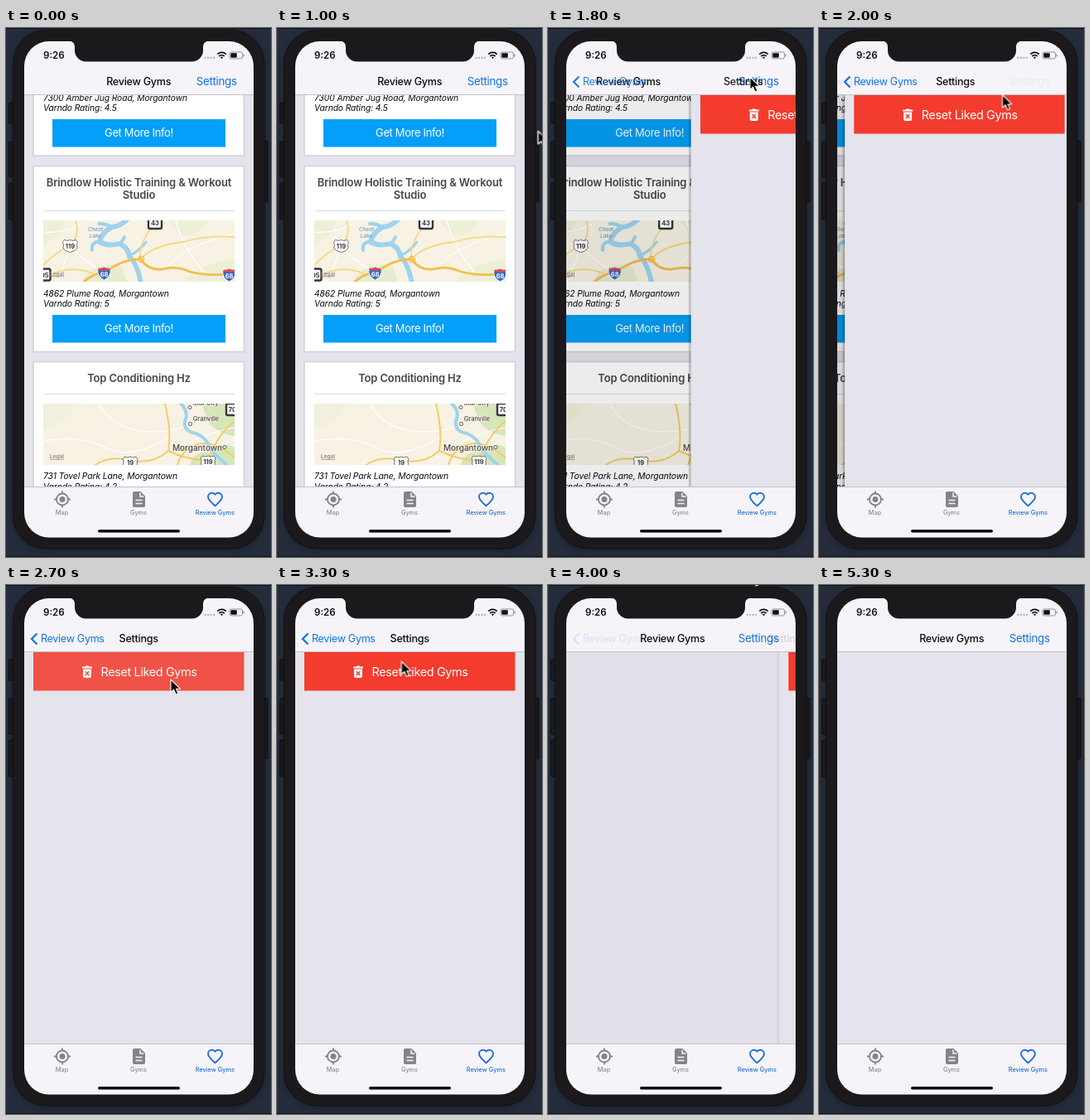
An HTML page for the animation above (5400 ms loop, 320 by 638 pixels).

```html
<!DOCTYPE html>
<html lang="en">
<head>
<meta charset="utf-8">
<title>Review Gyms</title>
<style>
  /* --q: navigation progress, 0 = list, 1 = settings */
  @property --q { syntax: "<number>"; inherits: true; initial-value: 0; }

  html, body { margin: 0; width: 100%; height: 100%; overflow: hidden; background: #252d3c; }
  svg { display: block; width: 320px; height: 638px; animation: navigate 5.4s infinite cubic-bezier(.2833, .99, .31833, .99); }
  text { font-family: Inter, Roboto, sans-serif; }

  .body { filter: drop-shadow(0 2px 4px rgba(0, 0, 0, .3)); }
  .mid { text-anchor: middle; }
  .nav { font-size: 12.56px; letter-spacing: -.3px; }
  .title { font-weight: 500; letter-spacing: -.25px; fill: #0c0c0c; text-anchor: middle; }
  .blue { fill: #1173ea; }
  .heading { font-size: 13px; font-weight: 600; letter-spacing: -.15px; fill: #43484d; text-anchor: middle; }
  .info { font-size: 10.3px; font-style: italic; letter-spacing: -.1px; fill: #0a0a0a; }
  .more { font-size: 12.9px; letter-spacing: -.3px; fill: #fff; text-anchor: middle; }
  .tab { font-size: 7.3px; font-weight: 500; fill: #8c8b90; text-anchor: middle; }
  .card { fill: #fff; stroke: #d3d2dc; stroke-width: 1.6; }
  .rule { stroke: #d9dfe5; }
  .sign { font-size: 7.5px; font-weight: 700; fill: #333; text-anchor: middle; }
  .place { font-weight: 500; fill: #4a4a4a; stroke: #f8f3e6; stroke-width: 1.5; paint-order: stroke; text-anchor: middle; }
  .legal { font-size: 6.5px; font-weight: 600; fill: #8a877f; text-decoration: underline; }
  .line { fill: none; stroke-linecap: round; stroke-linejoin: round; }

  .list { transform: translateX(calc(var(--q) * -83px)); }
  .dim { opacity: calc(var(--q) * .16); }
  .panel { transform: translateX(calc((1 - var(--q)) * 277px)); }
  .edge { opacity: calc(var(--q) * 4); }
  .list-title { transform: translateX(calc(var(--q) * -138.5px)); }
  .panel-title { transform: translateX(calc((1 - var(--q)) * 138.5px)); }
  .on-list { opacity: calc(2 - 2 * var(--q)); }
  .on-panel { opacity: calc(2 * var(--q)); }

  .gyms { animation: clear 5.4s infinite step-end; }
  .reset { animation: press-reset 5.4s infinite ease-in-out; }
  .back { animation: press-back 5.4s infinite ease-in-out; }
  .cursor { animation: point 5.4s infinite ease-in-out; }

  @keyframes navigate {
    0%, 32.074% { --q: 0; }
    41.333%, 70.056% { --q: 1; }
    79.315%, 100% { --q: 0; }
  }
  @keyframes clear { 0% { opacity: 1; } 52%, 100% { opacity: 0; } }
  @keyframes press-reset {
    0%, 49.4% { opacity: 1; }
    51.3% { opacity: .38; }
    55.7%, 100% { opacity: 1; }
  }
  @keyframes press-back {
    0%, 68.1% { opacity: 1; }
    70%, 70.4% { opacity: .25; }
    74.7%, 100% { opacity: 1; }
  }
  @keyframes point {
    0%, 15.74% { transform: translate(332px, 140px); }
    25% { transform: translate(245px, 58px); }
    32.6% { transform: translate(245px, 58px); animation-timing-function: ease-in; }
    37.04% { transform: translate(221.5px, 80.5px); animation-timing-function: ease-out; }
    48.15%, 55.9% { transform: translate(199px, 114px); }
    68.15%, 70.37% { transform: translate(69.5px, 56px); }
    74.07% { transform: translate(245px, -17px); }
    74.8%, 100% { transform: translate(270px, -40px); }
  }
</style>
</head>
<body>
<svg viewBox="0 0 320 638">
  <defs>
    <clipPath id="content"><rect x="22" y="81" width="277" height="472"/></clipPath>
    <clipPath id="header"><rect x="22" y="45" width="277" height="35"/></clipPath>
    <clipPath id="map-a"><rect x="45" y="232" width="231" height="74"/></clipPath>
    <clipPath id="map-b"><rect x="45" y="453" width="231" height="74"/></clipPath>
    <linearGradient id="shade">
      <stop offset="0" stop-opacity="0"/>
      <stop offset="1" stop-opacity=".3"/>
    </linearGradient>
    <g id="more">
      <rect x="56" width="209" height="33.5" fill="#039ff8"/>
      <text class="more" x="160.5" y="21.3">Get More Info!</text>
    </g>
    <g id="interstate">
      <path d="M-7-6Q-3.500-5 0-7Q3.500-5 7-6Q9 0 6 4Q4 7 0 9Q-4 7-6 4Q-9 0-7-6Z" fill="#3767c0" stroke="#fff"/>
      <path d="M-6.800-5.500Q-3.500-4.500 0-6.500Q3.500-4.500 6.800-5.500L7.400-2.500H-7.400Z" fill="#dc4a50"/>
      <text class="sign" y="4.800" style="fill:#fff">68</text>
    </g>
    <path id="us-route" d="M-7-7Q-3-5 0-7Q3-5 7-7L9-4Q7-1 8.500 2Q8 6 0 8Q-8 6-8.500 2Q-7-1-9-4Z" fill="#fff" stroke="#55534f" stroke-width=".8"/>
    <rect id="state-route" x="-8" y="-7.500" width="16" height="14" rx="2" fill="#fff" stroke="#36363a" stroke-width="2.400"/>
  </defs>

  <!-- phone body -->
  <rect width="320" height="638" fill="#252d3c"/>
  <path d="M0 .5H320M0 637.500H320" stroke="#10141b"/>
  <g fill="#1c1d22" stroke="#0d0e11">
    <rect x="3.500" y="90" width="6" height="25" rx="1"/>
    <rect x="3.500" y="137" width="6" height="43" rx="1"/>
    <rect x="3.500" y="187" width="6" height="44" rx="1"/>
    <rect x="310" y="136.500" width="6" height="73" rx="1"/>
  </g>
  <rect class="body" x="8.500" y="2.500" width="303.500" height="625.500" rx="40" fill="#1b191c" stroke="#111013"/>
  <rect x="22" y="16" width="277" height="598.500" rx="30" fill="#f6f4f8"/>

  <g clip-path="url(#content)">
    <rect x="22" y="81" width="277" height="472" fill="#e5e4ec"/>
    <g class="list"><g class="gyms">
      <rect class="card" x="33" y="60" width="254.500" height="94"/>
      <text class="info" x="45" y="87.500">7300 Amber Jug Road, Morgantown</text>
      <text class="info" x="45" y="100">Varndo Rating: 4.5</text>
      <use href="#more" y="110"/>

      <rect class="card" x="33" y="166.500" width="254.500" height="224"/>
      <text class="heading" x="160.500" y="190.500">Brindlow Holistic Training &amp; Workout</text>
      <text class="heading" x="160.500" y="206">Studio</text>
      <path class="rule" d="M45 220.500H276"/>
      <g clip-path="url(#map-a)">
        <rect x="45" y="232" width="231" height="74" fill="#f7f2e4"/>
        <path d="M45 232H72Q66 252 50 258L45 262ZM196 232H244Q232 252 212 250ZM216 306Q232 284 276 278V306Z" fill="#edf0d6"/>
        <path d="M92 306Q104 280 140 288L146 306Z" fill="#e6edcf"/>
        <g class="line" stroke="#9fd3ef">
          <path d="M147 230Q139 239 128 240Q116 246 113 258Q124 264 137 260Q148 265 149 276Q158 283 163 308" stroke-width="6"/>
          <path d="M113 257Q102 259 104 268M128 241Q122 236 112 236M138 261L143 252" stroke-width="4"/>
          <path d="M148 275Q160 270 169 258" stroke-width="3"/>
        </g>
        <g class="line" stroke="#fff" stroke-width="1.200">
          <path d="M45 246Q70 248 92 236M77 262Q92 280 118 295M190 293Q214 262 276 248M205 232Q212 262 238 294M60 306Q72 284 77 262"/>
        </g>
        <g class="line" stroke="#f5d981" stroke-width="1.800">
          <path d="M45 286Q60 270 77 263Q90 250 84 232M162 278Q160 258 180 236M163 278Q178 262 214 258Q240 250 276 252M45 302Q74 284 105 296"/>
        </g>
        <path class="line" d="M92 308Q104 296 119 295Q142 278 163 279Q171 292 188 291Q206 286 222 294Q246 300 276 296" stroke="#f3bd4c" stroke-width="2.800"/>
        <circle cx="163" cy="279" r="3.500" fill="none" stroke="#f3bd4c" stroke-width="1.500"/>
        <g class="mid" font-size="6.300" font-style="italic" font-weight="500" fill="#6f9fbd">
          <text x="108" y="245">Cheat</text><text x="108" y="252.500">Lake</text>
        </g>
        <use href="#state-route" x="180" y="235.500"/><text class="sign" x="180" y="238">43</text>
        <use href="#us-route" x="77.500" y="262.500"/><text class="sign" x="77.500" y="265.500">119</text>
        <use href="#state-route" x="45.500" y="298"/><text class="sign" x="46.500" y="300.500">05</text>
        <use href="#interstate" x="118.500" y="295"/>
        <use href="#interstate" x="269.500" y="297"/>
        <text class="legal" x="53" y="298.500">Legal</text>
      </g>
      <text class="info" x="45" y="324">4862 Plume Road, Morgantown</text>
      <text class="info" x="45" y="336">Varndo Rating: 5</text>
      <use href="#more" y="346"/>

      <rect class="card" x="33" y="402.500" width="254.500" height="224"/>
      <text class="heading" x="160.500" y="426.500">Top Conditioning Hz</text>
      <path class="rule" d="M45 441.500H276"/>
      <g clip-path="url(#map-b)">
        <rect x="45" y="453" width="231" height="74" fill="#f7f2e4"/>
        <path d="M236 453H276V492Q252 488 244 474ZM222 527Q226 510 246 512Q262 498 276 506V527Z" fill="#d5e6b9"/>
        <path d="M45 453H84Q76 478 45 482Z" fill="#f1f0dc"/>
        <g class="line" stroke="#fff" stroke-width="1.200">
          <path d="M45 498Q90 490 120 506T196 494M112 453Q128 482 164 486T222 478M222 500Q250 486 276 482"/>
        </g>
        <g class="line" stroke="#f3cc68" stroke-width="2">
          <path d="M104 530Q122 514 152 522Q178 526 196 510Q200 486 192 453M196 510Q216 520 244 522Q254 492 276 474M206 530Q210 512 226 504Q246 494 276 518"/>
        </g>
        <path class="line" d="M208 450Q222 462 216 474Q214 487 230 489Q244 496 245 506Q254 516 270 530" stroke="#9fd3ef" stroke-width="4"/>
        <g fill="#fff" stroke="#555">
          <circle cx="222" cy="457.500" r="2"/><circle cx="222.500" cy="477.500" r="2"/><circle cx="264" cy="505.500" r="2"/>
        </g>
        <text class="place" x="241" y="454.500" font-size="7.500">Star City</text>
        <text class="place" x="241.500" y="474" font-size="7.500">Granville</text>
        <text class="place" x="231" y="510" font-size="10">Morgantown</text>
        <use href="#us-route" x="150" y="524"/><text class="sign" x="150" y="527">19</text>
        <use href="#us-route" x="244" y="523"/><text class="sign" x="244" y="526">119</text>
        <use href="#state-route" x="274" y="460.500"/><text class="sign" x="273.500" y="463">70</text>
        <text class="legal" x="53" y="519">Legal</text>
      </g>
      <text class="info" x="45" y="544">731 Tovel Park Lane, Morgantown</text>
      <text class="info" x="45" y="556.500">Varndo Rating: 4.2</text>
    </g></g>

    <rect class="dim" x="22" y="81" width="277" height="472"/>
    <g class="panel">
      <rect class="edge" x="18" y="81" width="4" height="472" fill="url(#shade)"/>
      <rect x="22" y="81" width="277" height="472" fill="#e5e4ec"/>
      <g class="reset">
        <rect x="33" y="81" width="254.500" height="46.500" fill="#f33b2e"/>
        <path d="M92 98.500H95.500L96.500 97.500H99.500L100.500 98.500H104V100.500H92ZM93 101.500H103V110Q103 112 101 112H95Q93 112 93 110Z" fill="#fff"/>
        <path d="M95.800 104.200L100.200 109M100.200 104.200L95.800 109" stroke="#f33b2e" stroke-width="1.500"/>
        <text x="114.500" y="109.800" font-size="14.400" letter-spacing="-.35" fill="#fff">Reset Liked Gyms</text>
      </g>
    </g>
  </g>

  <!-- navigation bar -->
  <path d="M22 80.500H299M22 553.500H299" stroke="#c3c2c8"/>
  <g clip-path="url(#header)" class="nav">
    <g class="on-list">
      <text class="title list-title" x="160.200" y="69.200">Review Gyms</text>
      <text class="blue" x="229.800" y="69.200" font-size="13.300">Settings</text>
    </g>
    <g class="on-panel">
      <text class="title panel-title" x="160.200" y="69.200">Settings</text>
      <g class="back">
        <path d="M37.500 58.500L31 65L37.500 71.500" fill="none" stroke="#1173ea" stroke-width="2.300"/>
        <text class="blue" x="42" y="69.200">Review Gyms</text>
      </g>
    </g>
  </g>

  <!-- status bar -->
  <path d="M76 15.500Q83 16 83 23V27A13.500 13.500 0 0 0 96.500 40.500H224.500A13.500 13.500 0 0 0 238 27V23Q238 16 245 15.500Z" fill="#1b191c"/>
  <text x="45" y="37" font-size="11.600" font-weight="600" fill="#111">9:26</text>
  <g fill="#b9b8bd">
    <circle cx="240.500" cy="36" r="1.200"/><circle cx="244" cy="36" r="1.200"/>
    <circle cx="247.500" cy="36" r="1.200"/><circle cx="251" cy="36" r="1.200"/>
  </g>
  <g fill="none" stroke="#111" stroke-width="1.700">
    <path d="M255.200 31.600Q260.500 27.200 265.800 31.600M257.300 34Q260.500 31.500 263.700 34"/>
    <path d="M258.800 35.300Q260.500 34.200 262.200 35.300L260.500 37.200Z" fill="#111" stroke="none"/>
  </g>
  <rect x="270" y="29" width="15.500" height="8" rx="2" fill="none" stroke="#8b8a8f" stroke-width=".9"/>
  <rect x="271.300" y="30.300" width="7.500" height="5.400" rx="1" fill="#111"/>
  <path d="M287 31.500V34.500" stroke="#8b8a8f" stroke-width="1.200"/>

  <!-- tab bar -->
  <g stroke="#848388" stroke-width="1.800" fill="none">
    <circle cx="68" cy="568.500" r="7"/>
    <path d="M68 558.500V562M68 575V578.500M58 568.500H61.500M74.500 568.500H78"/>
    <circle cx="68" cy="568.500" r="3.500" fill="#848388" stroke="none"/>
  </g>
  <path d="M155 559H162.500L168 564.500V576Q168 578 166 578H155Q153 578 153 576V561Q153 559 155 559Z" fill="#848388"/>
  <path d="M162 560.500V565H166.500M156.500 569.500H164.500M156.500 573.500H164.500" fill="none" stroke="#f6f4f8" stroke-width="1.500"/>
  <path transform="translate(242.300 558.200) scale(.85)" d="M12 21.350l-1.450-1.320C5.400 15.360 2 12.280 2 8.500 2 5.420 4.420 3 7.500 3c1.740 0 3.410.81 4.500 2.090C13.090 3.810 14.760 3 16.500 3 19.580 3 22 5.420 22 8.500c0 3.780-3.400 6.860-8.550 11.540Z" fill="none" stroke="#1f6fdb" stroke-width="2.200"/>
  <text class="tab" x="67.500" y="586.700">Map</text>
  <text class="tab" x="160" y="586.700">Gyms</text>
  <text class="tab" x="252.300" y="586.700" style="fill:#1f6fdb">Review Gyms</text>
  <rect x="111" y="605" width="99" height="3.600" rx="1.800" fill="#08080a"/>

  <path class="cursor" d="M0 0V15.500L3.600 12.200L6.200 18L9 16.800L6.500 11.200H11.300Z" fill="#000" stroke="#fff" stroke-width="1.100" stroke-linejoin="round"/>
</svg>
</body>
</html>
```
